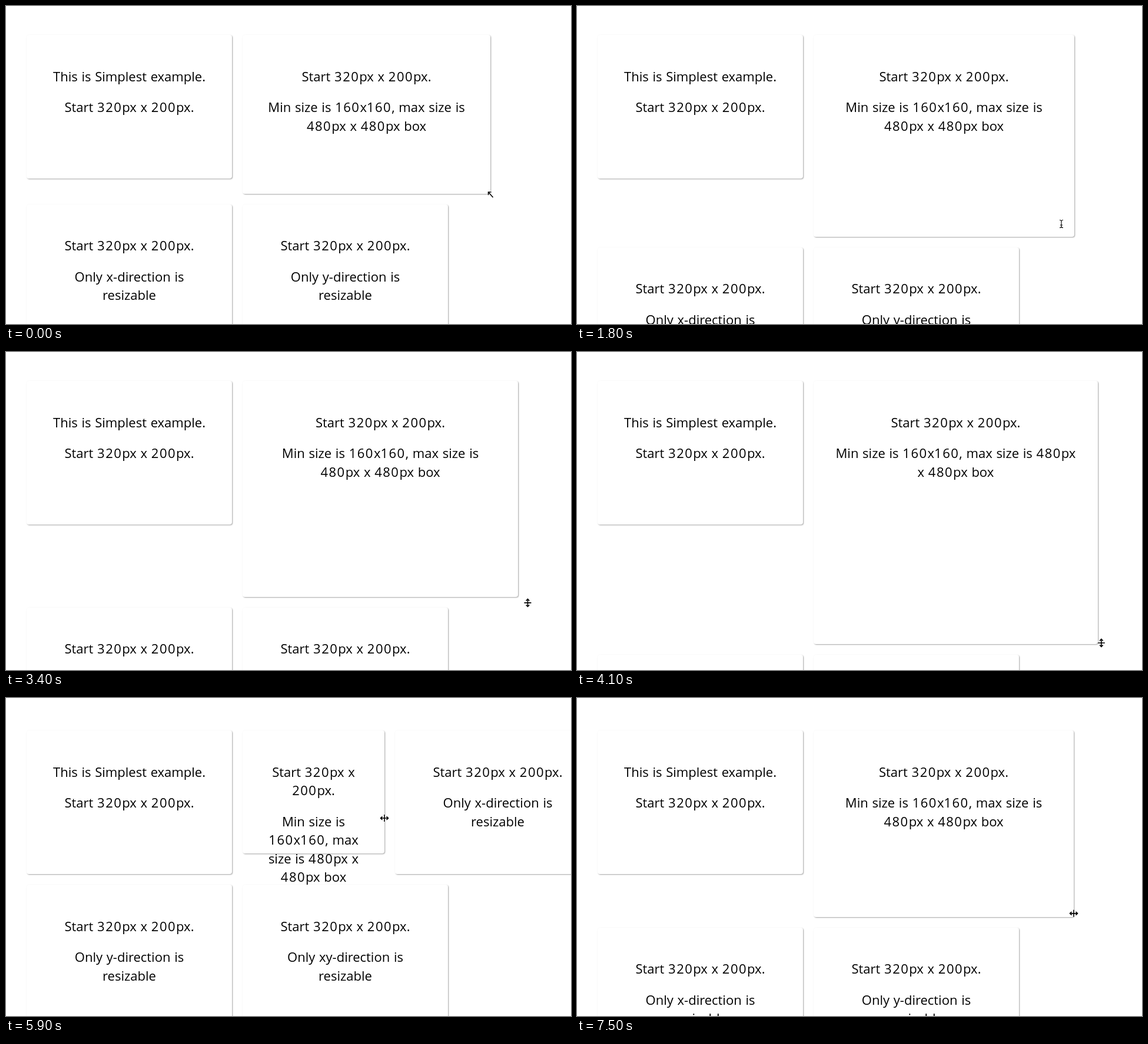
Write an HTML page that moves like this. It is 960x540 px and loops after 7600 ms.

```html
<!DOCTYPE html>
<html lang="en">
<head>
<meta charset="utf-8">
<title>Resizable boxes</title>
<style>
  html, body { margin: 0; width: 100%; height: 100%; overflow: hidden; background: #fff; }
  #stage { position: relative; width: 960px; height: 540px; overflow: hidden; }
  #boxes {
    position: absolute; left: 35px; top: 49px; width: 1000px;
    display: flex; flex-wrap: wrap; gap: 18px; align-items: flex-start;
    font: 22px/31.5px "Open Sans", "Noto Sans", sans-serif;
    word-spacing: 1px; color: #000; text-align: center;
    animation: scroll 7.6s step-end infinite;
  }
  @keyframes scroll { 76.3% { top: 55px; } 100% { top: 55px; } }
  .box {
    position: relative; z-index: 0; box-sizing: border-box; flex: none;
    width: 349px; height: 244px; padding: 54.6px 35px 0; border-radius: 4px;
    box-shadow: 1px 1px 2px rgba(0, 0, 0, .36);
  }
  p { margin: 0 0 21px; }
  i { font-style: normal; letter-spacing: 1.5px; }
  #mark { position: absolute; z-index: -1; right: 35px; height: 31px; background: #b1d6fe; }
  #cursor { position: absolute; left: -12px; top: -12px; width: 24px; height: 24px; }
  #cursor path { fill: none; stroke: #000; stroke-width: 1.6; }
  #cursor .halo { stroke: #fff; stroke-width: 3.6; }
  #cursor .text { stroke-width: 1.1; }
</style>
</head>
<body>
<div id="stage">
  <div id="boxes"></div>
  <svg id="cursor" viewBox="-12 -12 24 24"></svg>
</div>
<script>
const LOOP = 7600, STEP = 100;
const START = "Start 320px x 200px.";
const TEXTS = [
  ["This is Simplest example.", START],
  [START, "Min size is 160x160, max size is 480px x 480px box"],
  ...["x", "y", "xy"].map(d => [START, `Only ${d}-direction is resizable`])
];

// Sizes the box is dragged through, at a steady pace in between
const SIZES = [
  { at: 0, w: 421, h: 269.5 },
  { at: 1100, w: 442, h: 349.5 },
  { at: 2500, w: 444, h: 335.5 },
  { at: 3400, w: 468, h: 366.5 },
  { at: 4200, w: 485, h: 458 },
  { at: 4700, w: 487, h: 416 },
  { at: 5900, w: 241, h: 209 },
  { at: 7500, w: 442, h: 316.5 }
];

// Pointer shapes; grip is the pointer's distance from the box corner
const ARROWS = "M-6.5 0H6.5M-3.5 -2.8L-6.5 0L-3.5 2.8M3.5 -2.8L6.5 0L3.5 2.8M0 -6V6";
const POINTERS = [
  { name: "corner", until: 900, d: "M-4 -4L4 5M-4 1V-4H1", grip: () => [0.5, 1.5] },
  { name: "text", until: 2900, grip: () => [-22, -21.5],
    d: "M-3 -6.5Q0 -6.5 0 -4.5Q0 -6.5 3 -6.5M0 -5V5M-3 6.5Q0 6.5 0 4.5Q0 6.5 3 6.5M-2 2H2" },
  { name: "vertical", until: 5200, d: ARROWS, turn: 90,
    grip: (w, h) => [0.13 * (493 - h), 0.15 * (436 - h)] },
  { name: "horizontal", until: LOOP, d: ARROWS, grip: w => [0, 0.27 * (w - 463)] }
];

const byId = id => document.getElementById(id);
const boxes = byId("boxes"), cursor = byId("cursor");

boxes.innerHTML = TEXTS.map(lines =>
  '<div class="box">' + lines.map(s =>
    "<p>" + s.replace(/\d+/g, "<i>$&</i>") + "<span></span></p>").join("") + "</div>"
).join("");

const box = boxes.children[1];
const textEnd = box.querySelector("p:last-child span");
const mark = document.createElement("div");
mark.id = "mark";
box.prepend(mark);

function sizeAt(t) {
  const n = SIZES.findIndex((s, i) => i && s.at >= t);
  const a = SIZES[n - 1], b = SIZES[n];
  const f = (t - a.at) / (b.at - a.at);
  return [a.w + (b.w - a.w) * f, a.h + (b.h - a.h) * f];
}

let shown;
function setPointer(p) {
  if (p === shown) return;
  shown = p;
  const path = c => `<path class="${c}" d="${p.d}" transform="rotate(${p.turn || 0})"/>`;
  cursor.innerHTML = path("halo") + path(p.name);
}

function draw(t) {
  const [w, h] = sizeAt(t);
  box.style.width = w + "px";
  box.style.height = h + "px";

  // The last line's end is selected for a moment, twice
  const marked = (t >= 2100 && t < 2900) || (t >= 4300 && t < 5100);
  mark.style.display = marked ? "block" : "none";
  mark.style.left = textEnd.offsetLeft + "px";
  mark.style.top = textEnd.offsetTop - 5 + "px";

  const p = POINTERS.find(p => t < p.until);
  const [dx, dy] = p.grip(w, h);
  const x = boxes.offsetLeft + box.offsetLeft + w + dx;
  const y = boxes.offsetTop + box.offsetTop + h + dy;
  cursor.style.transform = `translate(${x}px, ${y}px)`;
  setPointer(p);
}

const scroll = boxes.getAnimations()[0];
const start = performance.now();
function tick() {
  const t = Math.floor((performance.now() - start) % LOOP / STEP) * STEP;
  scroll.currentTime = t;
  draw(t);
  requestAnimationFrame(tick);
}
tick();
</script>
</body>
</html>
```
